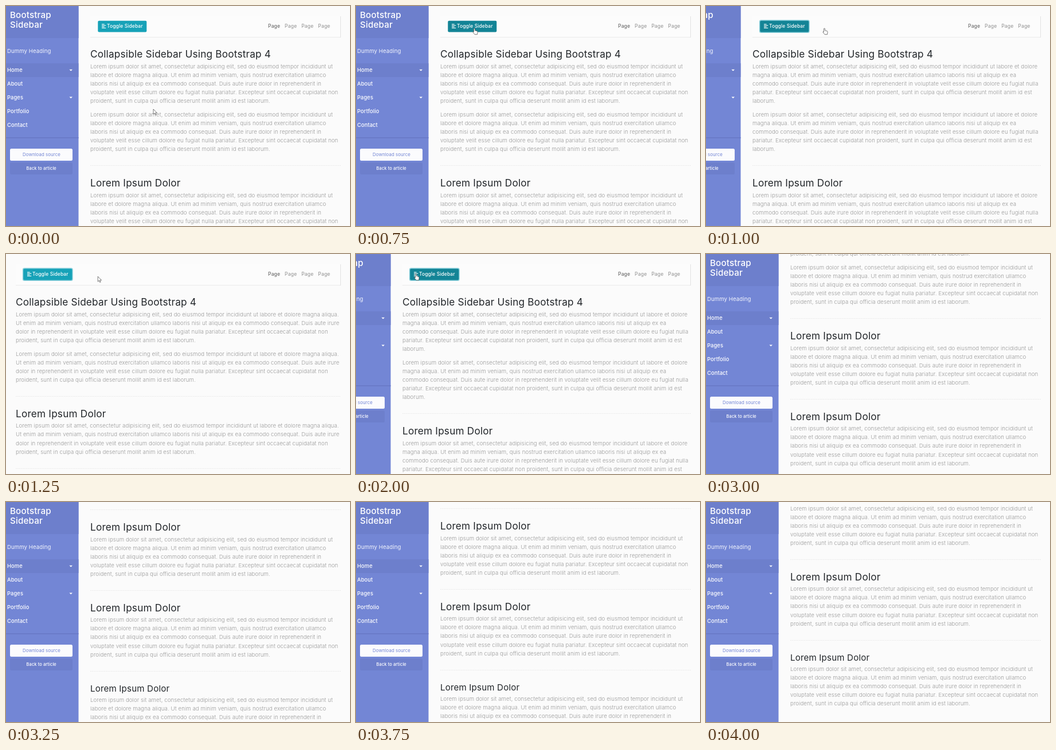
An HTML page with a canvas that plays this animation: 600x384 px, repeating every 5 s.

```html
<!DOCTYPE html>
<html lang="en">
<head>
<meta charset="utf-8">
<title>Collapsible sidebar</title>
<style>
  html, body { margin: 0; width: 100%; height: 100%; overflow: hidden; background: #fbfbfb; }
  canvas { display: block; }
</style>
</head>
<body>
<canvas id="stage" width="600" height="384"></canvas>
<script>
const ctx = document.getElementById("stage").getContext("2d");
const LOOP = 5000, STEP = 250;
const OPEN = 126.5, LEFT = 147, RIGHT = 584, LINE = 15.04;

const LOREM = "Lorem ipsum dolor sit amet, consectetur adipisicing elit, sed do eiusmod " +
  "tempor incididunt ut labore et dolore magna aliqua. Ut enim ad minim veniam, quis nostrud " +
  "exercitation ullamco laboris nisi ut aliquip ex ea commodo consequat. Duis aute irure dolor " +
  "in reprehenderit in voluptate velit esse cillum dolore eu fugiat nulla pariatur. Excepteur " +
  "sint occaecat cupidatat non proident, sunt in culpa qui officia deserunt mollit anim id est laborum.";

const wrap = (...starts) =>
  starts.reduce((s, w) => s.replace(" " + w, "\n" + w), LOREM).split("\n");

// Paragraph lines for each sidebar offset
const LINES = {
  0: wrap("labore", "laboris", "voluptate", "proident"),
  66: wrap("magna", "commodo", "pariatur", "laborum"),
  130: wrap("Ut ", "dolor in", "proident")
};

// Text styles: weight, size, letter spacing
const T = {
  title: [500, 15.2, 0.15],
  h2: [400, 17.2, 0.2],
  h3: [400, 15.1, 0.18],
  body: [300, 9.6, 0.1],
  button: [500, 8.5, 0.1],
  nav: [400, 8.6, 0.15],
  label: [400, 9.6, 0.08],
  menu: [500, 9.3, 0.12],
  source: [400, 7.8, 0.1],
  article: [500, 7.5, 0.08]
};

const ARROW = new Path2D("M.5 .5V9.5L2.6 7.6 4 10.8 5.4 10.2 4 7.1H6.9Z");
const HAND = new Path2D("M3 .5Q4 .5 4 1.5V4.3L7.6 5.2Q8.8 5.6 8.6 7L8 11.2H3.6L.7 7.6Q0 6.2 1 6.2L2 6.8V1.5Q2 .5 3 .5Z");

// Pointer per step: shape, x, y
const POINTER = [
  [ARROW, 256.5, 179.5], [ARROW, 221, 78.5], [ARROW, 198.5, 43],
  [HAND, 203.5, 38.5], [HAND, 203.5, 38.5],
  [ARROW, 159.7, 38.7], [ARROW, 112, 36],
  [HAND, 102, 35], [HAND, 101.5, 34.5]
];

function text(str, x, y, [weight, size, gap], color, align = "left") {
  ctx.font = `${weight} ${size}px Inter, "Open Sans", sans-serif`;
  ctx.letterSpacing = gap + "px";
  ctx.textAlign = align;
  ctx.fillStyle = color;
  ctx.fillText(str, x, y);
}

function rect(x, y, w, h, color, r = 0) {
  ctx.fillStyle = color;
  ctx.beginPath();
  ctx.roundRect(x, y, w, h, r);
  ctx.fill();
}

function stateAt(time) {
  const n = Math.floor(time / STEP);
  return {
    slide: n === 4 || n === 8 ? 66 : n > 4 && n < 8 ? 130 : 0,
    scroll: n < 12 ? 0 : n < 13 ? 166 : n < 15 ? 265 : n < 16 ? 267 : 319,
    hover: n === 3 || n === 4 || n === 7 || n === 8,
    focus: n > 3,
    pointer: POINTER[n]
  };
}

function drawNavbar(x, { hover, focus }) {
  rect(x, 18, RIGHT - x, 36, "#fcfcfc");
  rect(x, 54, RIGHT - x, 1, "#eaeaea");
  rect(RIGHT - 1, 18, 1, 37, "#e2e2e2");

  const bx = x + 13.3;
  if (focus) rect(bx - 1.4, 24.2, 87.8, 22.8, "#8bd0db", 3);
  rect(bx, 25.7, 85, 19.8, hover ? "#138496" : "#17a2b8", 2);
  for (let i = 0; i < 4; i++) rect(bx + 6.7, 31.3 + i * 2.2, i % 2 ? 7.2 : 4.6, 1.1, "#fff");
  text("Toggle Sidebar", bx + 15.7, 38.4, T.button, "#fff");

  for (let i = 0; i < 4; i++) text("Page", 457 + i * 29.1, 38.3, T.nav, i ? "#909090" : "#5a5a5a");
}

function drawArticle(x, lines) {
  const para = y => {
    lines.forEach((s, i) => text(s, x, y + i * LINE, T.body, "#999"));
    return y + lines.length * LINE;
  };
  const rule = y => {
    ctx.strokeStyle = "#ebebeb";
    ctx.lineWidth = 1;
    ctx.setLineDash([2, 1]);
    ctx.beginPath();
    ctx.moveTo(x, Math.floor(y) + 0.5);
    ctx.lineTo(RIGHT, Math.floor(y) + 0.5);
    ctx.stroke();
    ctx.setLineDash([]);
  };
  const section = (head, style, y) => {
    text(head, x, y, style, "#212529");
    return para(y + 18.8);
  };

  let y = section("Collapsible Sidebar Using Bootstrap 4", T.h2, 89.8);
  y = para(y + 8.8);
  for (const style of [T.h2, T.h2, T.h3]) {
    y += 10.9;
    rule(y);
    y = section("Lorem Ipsum Dolor", style, y + (style === T.h2 ? 36 : 35));
  }
}

function drawCaret(y) {
  ctx.fillStyle = "#fff";
  ctx.beginPath();
  ctx.moveTo(110.4, y);
  ctx.lineTo(116, y);
  ctx.lineTo(113.2, y + 2.8);
  ctx.fill();
}

function drawSidebar() {
  const base = "#7386d5", dark = "#6d7fcc";
  rect(0, 0, OPEN, 384, base);
  rect(0, 0, OPEN, 56, dark);
  text("Bootstrap", 7, 21, T.title, "#fff");
  text("Sidebar", 7, 38, T.title, "#fff");
  text("Dummy Heading", 2, 82, T.label, "#f4f6fd");

  rect(0, 100, OPEN, 24, dark);
  ["Home", "About", "Pages", "Portfolio", "Contact"].forEach((s, i) =>
    text(s, 2, 115.2 + i * 23.85, T.menu, "#fff"));
  drawCaret(110.8);
  drawCaret(158.5);
  rect(0, 229, OPEN, 2, "#6a7bc9");

  rect(7, 249, 109, 21, "#fbfbfd", 2.5);
  text("Download source", 62, 261.8, T.source, base, "center");
  rect(7, 273, 109, 21, dark, 2.5);
  text("Back to article", 61.7, 285.6, T.article, "#fff", "center");
}

function drawPointer([shape, x, y]) {
  ctx.save();
  ctx.translate(x, y);
  ctx.fillStyle = "#fff";
  ctx.fill(shape);
  ctx.strokeStyle = "#444";
  ctx.lineWidth = 0.7;
  ctx.stroke(shape);
  ctx.restore();
}

function frame(now) {
  const s = stateAt(now % LOOP);
  const x = LEFT - s.slide;

  rect(0, 0, 600, 384, "#fbfbfb");
  ctx.save();
  ctx.translate(0, -s.scroll);
  drawNavbar(x, s);
  drawArticle(x, LINES[s.slide]);
  ctx.restore();

  ctx.save();
  ctx.translate(-s.slide, 0);
  drawSidebar();
  ctx.restore();

  if (s.pointer) drawPointer(s.pointer);
}

const start = performance.now();
function tick() {
  frame(performance.now() - start);
  requestAnimationFrame(tick);
}
tick();
</script>
</body>
</html>
```
